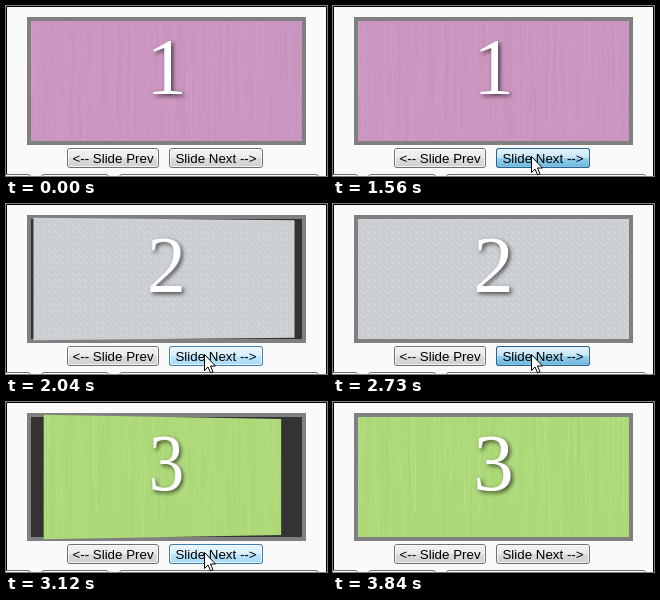
An HTML page that plays this animation: 321 by 170 pixels, repeating every 4560 ms.

```html
<!DOCTYPE html>
<html lang="en">
<head>
<meta charset="utf-8">
<title>Slide flip</title>
<style>
  html, body { margin: 0; width: 100%; height: 100%; overflow: hidden; background: #fafafa; }
  #stage { position: absolute; left: 0; top: 0; width: 321px; height: 170px; overflow: hidden; }
  #stage > svg { position: absolute; left: 0; top: 0; }
  #card { position: absolute; left: 25px; top: 15px; width: 271px; height: 120px; }
  #card svg { position: absolute; left: 0; top: 0; }
  .digit { font: 81px "Liberation Serif", "Times New Roman", serif; text-anchor: middle; text-shadow: 2px 2px 4px rgba(0, 0, 0, .65); }
  .label { font: 13.33px "Liberation Sans", Arial, sans-serif; text-anchor: middle; }
</style>
</head>
<body>
<div id="stage">
  <svg width="321" height="170">
    <rect width="321" height="170" fill="#fafafa"/>
    <path d="M.5 170V.5H320.5V170" fill="none" stroke="#000"/>
    <rect x="21" y="11" width="279" height="128" fill="#808080"/>
    <rect x="25" y="15" width="271" height="120" fill="#333"/>
  </svg>
  <div id="card"></div>
  <svg width="321" height="170">
    <defs id="defs"></defs>
    <g id="buttons"></g>
    <path id="cursor" d="M.5 .5V16.5L4 13L6.6 18.8L9 17.8L6.5 12H11.5Z" fill="#fff" stroke="#000"/>
  </svg>
</div>
<script>
const LOOP = 4560, STEP = 30, FLIP = 400;
const flips = [1782, 2904];
const $ = id => document.getElementById(id);
const clamp = v => Math.max(0, Math.min(1, v));
const ramp = (t, a, b) => clamp((t - a) / (b - a));
const lerp = (a, b, k) => a + (b - a) * k;

function ease(x) {
  if (x <= 0 || x >= 1) return clamp(x);
  const bez = (a, b, s) => 3 * a * s * (1 - s) ** 2 + 3 * b * s * s * (1 - s) + s ** 3;
  let lo = 0, hi = 1;
  for (let i = 0; i < 24; i++) {
    const mid = (lo + hi) / 2;
    if (bez(.25, .25, mid) < x) lo = mid; else hi = mid;
  }
  return bez(.1, 1, lo);
}

function seeded(seed) {
  return () => (seed = (seed * 16807) % 2147483647) / 2147483647;
}

// Wavy vertical wood grain
function grain(seed, light, dark) {
  const rnd = seeded(seed);
  let out = '';
  for (let x = 1; x < 271; x += 2 + rnd() * 3) {
    const y = rnd() < .5 ? 0 : rnd() * 80, len = 35 + rnd() * 85, bend = (rnd() - .5) * 5;
    out += `<path d="M${x} ${y}q${bend} ${len / 4} 0 ${len / 2}t0 ${len / 2}" stroke="${rnd() < .55 ? light : dark}" opacity="${.25 + rnd() * .4}"/>`;
  }
  return `<g fill="none">${out}</g>`;
}

const weave = `<pattern id="weave" width="6" height="6" patternUnits="userSpaceOnUse">
  <path d="M0 0L6 6M0 6L3 3" stroke="#c3c8cd" stroke-width=".8"/><path d="M3 0L6 3" stroke="#d7dade" stroke-width=".8"/>
  </pattern><rect width="271" height="120" fill="url(#weave)"/>`;

const faces = [
  ['#cb96c0', grain(11, '#d5a5cb', '#bf8ab4')],
  ['#cdd1d5', weave],
  ['#add979', grain(29, '#c0e498', '#a2cf6e')]
];
$('card').innerHTML = faces.map(([fill, texture], i) =>
  `<svg width="271" height="120"><rect width="271" height="120" fill="${fill}"/>${texture}
   <rect class="shade" width="271" height="120"/>
   <text class="digit" x="135.5" y="73">${i + 1}</text></svg>`).join('');
const slides = [...$('card').children];

const skins = {
  normal: ['#f2f2f2', '#ebebeb', '#dddddd', '#cfcfcf', '#707070'],
  hover: ['#eaf6fd', '#d9f0fc', '#bee6fd', '#a7d9f5', '#3c7fb1'],
  press: ['#e5f4fc', '#c4e5f6', '#98d1ef', '#68b3db', '#2c628b']
};
$('defs').innerHTML = Object.entries(skins).map(([name, c]) =>
  `<linearGradient id="${name}" x2="0" y2="1">` +
  [0, .5, .5, 1].map((o, i) => `<stop offset="${o}" stop-color="${c[i]}"/>`).join('') +
  '</linearGradient>').join('');

function button(x, y, w, label, id) {
  const skin = name => `<g ${name === 'normal' ? '' : `id="${id}-${name}" opacity="0"`}>
    <rect x="${x + .5}" y="${y + .5}" width="${w - 1}" height="19" rx="2.5" fill="url(#${name})" stroke="${skins[name][4]}"/>
    <rect x="${x + 1.5}" y="${y + 1.5}" width="${w - 3}" height="17" rx="1.5" fill="none" stroke="#fff" opacity="${name === 'press' ? .15 : .7}"/></g>`;
  return Object.keys(skins).map(skin).join('') +
    `<text class="label" x="${x + w / 2}" y="${y + 15}">${label}</text>`;
}
$('buttons').innerHTML =
  button(61, 142, 92, '&lt;-- Slide Prev', 'prev') +
  button(163, 142, 94, 'Slide Next --&gt;', 'next') +
  button(-40, 168, 65, '', 'low1') + button(35, 168, 68, '', 'low2') + button(113, 168, 200, '', 'low3');

function drawCard(t) {
  let face = 0, angle = 0, shade = 0, dark = 0;
  flips.forEach((start, i) => {
    if (t < start) return;
    const turn = 180 * ease((t - start) / FLIP);
    const leaving = turn < 90;
    face = leaving ? i : i + 1;
    angle = leaving ? -turn : 180 - turn;
    shade = leaving ? .48 * turn / 90 : .4 * ramp(angle, 35, 90);
    dark = leaving ? ramp(turn, 0, 45) : 0;
  });
  slides.forEach((s, i) => s.style.display = i === face ? 'block' : 'none');
  $('card').style.transform = angle ? `perspective(1900px) rotateY(${angle}deg)` : 'none';
  const slide = slides[face], ink = Math.round(255 * (1 - dark));
  slide.querySelector('.shade').setAttribute('opacity', shade);
  slide.querySelector('.digit').setAttribute('fill', `rgb(${ink},${ink},${ink})`);
}

function drawPointer(t) {
  const enter = ramp(t, 720, 900), leave = ramp(t, 3600, 3780);
  const inK = 1 - (1 - enter) ** 2, outK = leave ** 1.5;
  const x = lerp(lerp(290, 198, inK), 305, outK);
  const y = lerp(lerp(172, 150, inK), 176, outK);
  $('cursor').setAttribute('transform', `translate(${Math.round(x)} ${Math.round(y)})`);
  $('cursor').style.display = t >= 750 && t < 3780 ? '' : 'none';

  const press = t < 2000
    ? (t >= 1560) * (1 - ramp(t, 1620, 1740))
    : (t >= 2730) * (1 - ramp(t, 2730, 2880));
  $('next-hover').setAttribute('opacity', ramp(t, 810, 960) * (1 - ramp(t, 3660, 3840)));
  $('next-press').setAttribute('opacity', press);
  $('low3-hover').setAttribute('opacity', ramp(t, 720, 780) * (1 - ramp(t, 810, 930)));
}

function draw(time) {
  const t = Math.floor(time % LOOP / STEP) * STEP;
  drawCard(t);
  drawPointer(t);
}

const begin = performance.now();
function tick() {
  draw(performance.now() - begin);
  requestAnimationFrame(tick);
}
tick();
</script>
</body>
</html>
```
